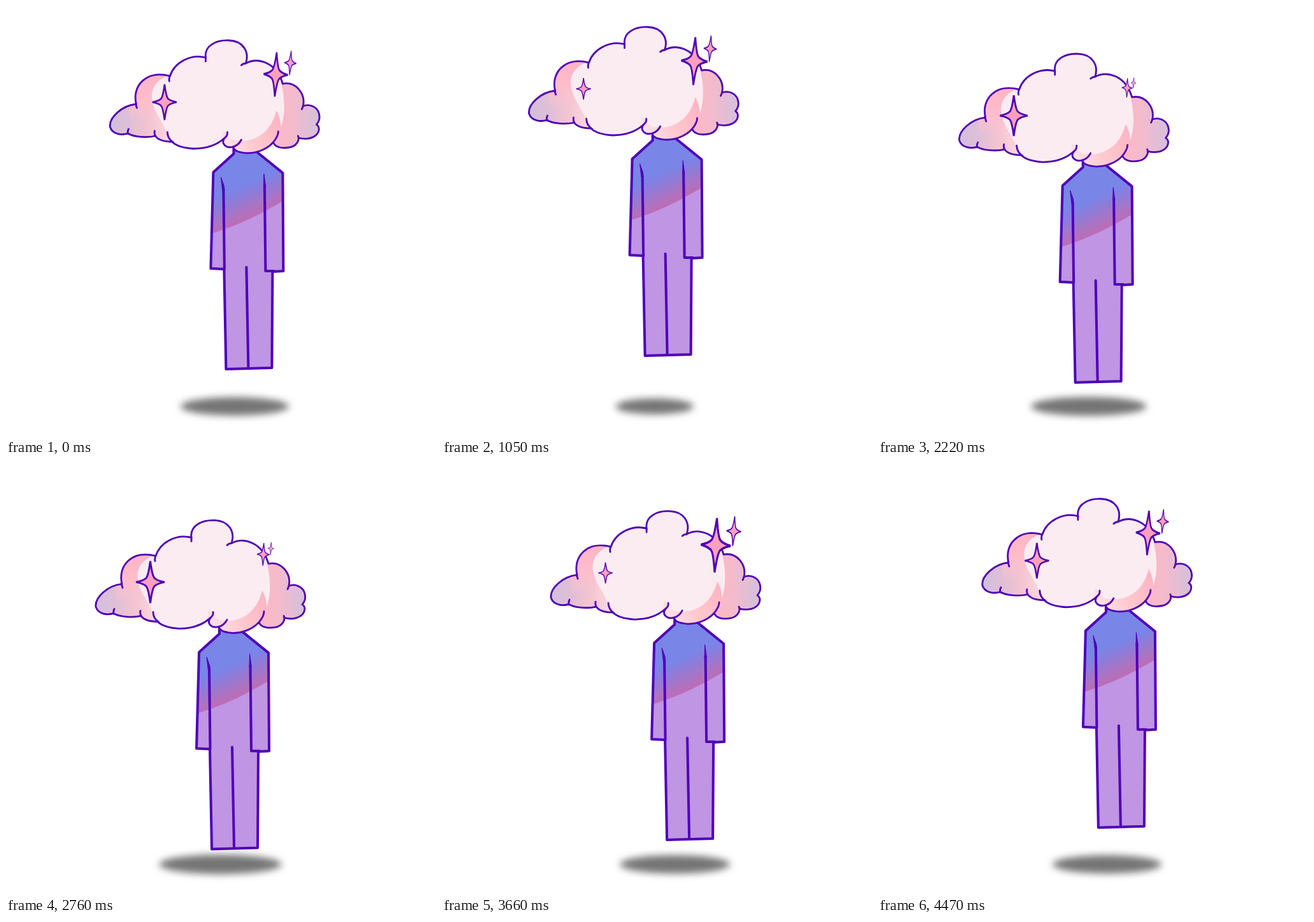
Write an HTML page that moves like this. It is 675 px wide and 675 px high and loops after 4500 ms.

```html
<!DOCTYPE html>
<html lang="en">
<head>
<meta charset="utf-8">
<title>Floating cloud person</title>
<style>
  html, body { margin: 0; height: 100%; overflow: hidden; background: #fff; }
  svg { display: block; width: 100%; height: 100%; }
  .ink { fill: none; stroke: #4f00b6; stroke-linecap: round; stroke-linejoin: round; }
  .star { fill: #ff9fbe; stroke: #4f00b6; stroke-width: 2.5; }
</style>
</head>
<body>
<svg viewBox="0 0 675 675">
  <defs>
    <linearGradient id="mist" gradientUnits="userSpaceOnUse" x1="163" x2="492" y1="0" y2="0">
      <stop offset="0" stop-color="#d2bfdd"/>
      <stop offset=".1" stop-color="#e0bfd6"/>
      <stop offset=".19" stop-color="#f4c4d1"/>
      <stop offset=".27" stop-color="#fad5de"/>
      <stop offset=".32" stop-color="#fbecf2"/>
      <stop offset=".78" stop-color="#ffb6c5"/>
      <stop offset=".87" stop-color="#f3bbcb"/>
      <stop offset="1" stop-color="#d3c0de"/>
    </linearGradient>
    <linearGradient id="blush" gradientUnits="userSpaceOnUse" x1="215" y1="108" x2="222" y2="182">
      <stop offset="0" stop-color="#ffb4c5"/>
      <stop offset=".5" stop-color="#ffbcca"/>
      <stop offset="1" stop-color="#ffc4cf" stop-opacity="0"/>
    </linearGradient>
    <linearGradient id="rim" gradientUnits="userSpaceOnUse" x1="425" y1="180" x2="350" y2="222">
      <stop offset="0" stop-color="#ffb6c4"/>
      <stop offset=".6" stop-color="#ffcad0"/>
      <stop offset="1" stop-color="#fde0e7"/>
    </linearGradient>
    <linearGradient id="dusk" gradientUnits="userSpaceOnUse" x1="378" y1="335" x2="357" y2="290">
      <stop offset="0" stop-color="#bd6cb5"/>
      <stop offset=".3" stop-color="#ab74c3"/>
      <stop offset=".6" stop-color="#947ad4"/>
      <stop offset=".85" stop-color="#8480e0"/>
      <stop offset="1" stop-color="#7985e7"/>
    </linearGradient>
    <path id="sky" d="M313 82C310 62 330 53 350 54C372 55 382 72 376 90C395 80 424 88 434 122C455 118 470 138 466 157C476 153 486 158 490 166C494 176 490 183 487 186C493 190 491 197 488 201C480 210 466 209 459 207C459 215 452 221 444 222C433 224 422 222 419 214C410 224 395 231 378 231C366 230 358 228 356 221C345 224 336 216 343 207C330 219 312 224 294 224C278 223 266 219 260 213C248 213 238 210 234 204C222 207 200 206 191 200C182 203 167 202 163 190C161 175 182 156 204 154C197 125 220 100 257 110C264 88 290 75 313 81Z"/>
    <path id="suit" d="M357 220V232L325 261L321 412L342 413L345 570L417 568L418 417L435 416L434 262L392 228V215Z"/>
    <path id="spark" d="M0-28Q2.500-9 5.500-5.500Q9-2 19 0Q9 2 5.500 5.500Q2.500 9 0 28Q-2.500 9-5.500 5.500Q-9 2-19 0Q-9-2-5.500-5.500Q-2.500-9 0-28Z"/>
    <clipPath id="inSky"><use href="#sky"/></clipPath>
    <clipPath id="inSuit"><use href="#suit"/></clipPath>
    <filter id="soft" filterUnits="userSpaceOnUse" x="200" y="590" width="300" height="85"><feGaussianBlur stdDeviation="5.6"/></filter>
  </defs>

  <ellipse id="shadow" cy="628.5" fill="#747474" filter="url(#soft)"/>

  <g id="figure">
    <use href="#suit" fill="#bf95e4"/>
    <path clip-path="url(#inSuit)" fill="url(#dusk)" d="M310 200H450V297C405 323 375 342 310 361Z"/>
    <g class="ink" stroke-width="4">
      <use href="#suit"/>
      <path d="M341 288L342.500 413M405.500 282L407 416H420M377 410L380 568"/>
      <path fill="#4f00b6" stroke-width="1" d="M337 269L339.500 290H342.500L342 283ZM404.500 264L404 284H407Z"/>
    </g>

    <use href="#sky" fill="url(#mist)"/>
    <g clip-path="url(#inSky)">
      <path fill="url(#blush)" d="M190 90H262V118C236 122 225 150 236 185L195 180Z"/>
      <path fill="#fbecf2" d="M258 108C236 114 226 130 229 147C231 166 246 180 254 203L262 230H400L428 198C438 177 439 150 431 118L400 40H290Z"/>
      <path fill="url(#rim)" d="M424 164C418 190 400 211 369 212L340 195L335 235H400L431 200C432 185 430 174 424 164Z"/>
      <path fill="#fbecf2" d="M348 198L349 206Q358 214 369 210L366 195Z"/>
    </g>
    <g class="ink" stroke-width="2.800">
      <use href="#sky"/>
      <path d="M376 90q-4 0-7 3M313 80v7M257 109q-2 5-1 9M203 153l2 7M191 201q-1-4 1-8M234 204q-2-4-1-8M262 214C256 210 253 204 253 198M343 207q5-4 4-9M356 221C364 219 367 214 369 210M419 214C424 208 427 203 427 197M459 208q0-2-1-4M466 157l-2 5"/>
    </g>

    <use id="leftStar" class="star" href="#spark"/>
    <g id="rightStars">
      <use class="star" href="#spark" transform="translate(-6 0) rotate(2.500) scale(1 1.240)"/>
      <use class="star" href="#spark" transform="translate(17 -18) rotate(4) scale(.49 .68)"/>
    </g>
  </g>
</svg>
<script>
  const LOOP = 4500, STEP = 30;
  // Ten evenly spaced poses per loop.
  const poses = {
    x: [0, -9.4, -23.2, -32.5, -37.8, -35.3, -24.3, -8, 7, 6],
    y: [0, -13, -23, -11.5, 6.5, 22, 34, 31, 21.5, 10],
    left: [1, .77, .59, .7, .95, 1.15, 1.2, .88, .59, .74],
    right: [1, 1.09, 1.13, .92, .62, .43, .48, .85, 1.21, 1.17],
    shadowX: [359, 347, 336, 331, 329, 331, 335, 350, 365, 364],
    shadowW: [86, 72, 61, 69, 83, 92, 97, 95, 88, 86]
  };
  const el = id => document.getElementById(id);

  // Smooth periodic curve through evenly spaced values.
  function curve(v, phase) {
    const n = v.length, p = phase * n, i = Math.floor(p), s = p - i;
    const [a, b, c, d] = [-1, 0, 1, 2].map(k => v[(i + k + n) % n]);
    return b + s / 2 * (c - a + s * (2 * a - 5 * b + 4 * c - d + s * (3 * (b - c) + d - a)));
  }

  function draw(now) {
    const phase = Math.floor(now % LOOP / STEP) * STEP / LOOP;
    const at = name => curve(poses[name], phase);
    const w = at('shadowW');
    el('figure').setAttribute('transform', `translate(${at('x') + .4} ${at('y')})`);
    el('leftStar').setAttribute('transform', `translate(248.500 151) scale(${at('left')})`);
    el('rightStars').setAttribute('transform', `translate(429 107.500) scale(${at('right')})`);
    el('shadow').setAttribute('cx', at('shadowX'));
    el('shadow').setAttribute('rx', w - 1);
    el('shadow').setAttribute('ry', 7.5 + w * .08);
  }

  const start = performance.now();
  function frame() {
    draw(performance.now() - start);
    requestAnimationFrame(frame);
  }
  frame();
</script>
</body>
</html>
```
